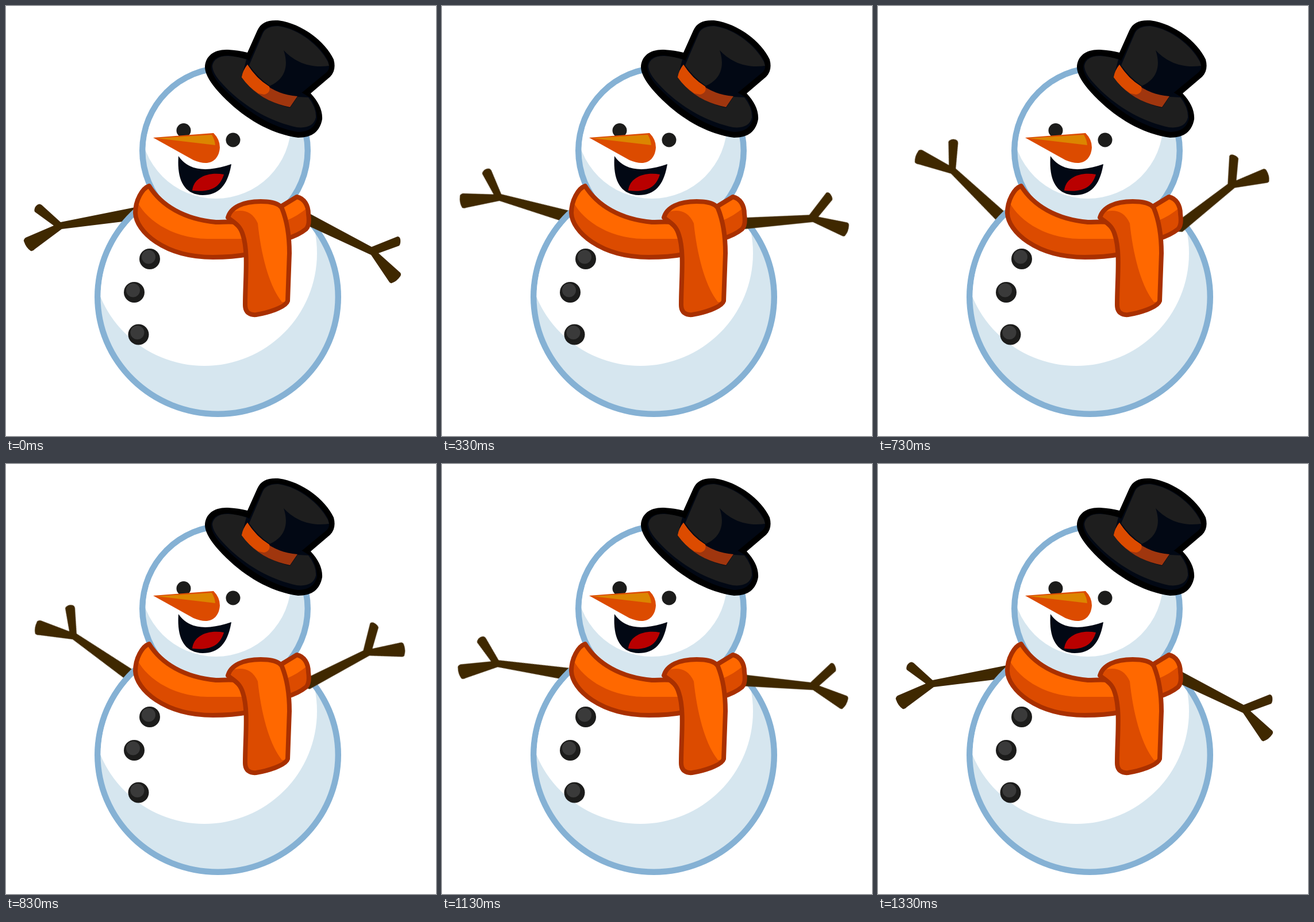
An HTML page for the animation above (1.36 s loop, 748 px wide and 748 px high).

```html
<!DOCTYPE html>
<html lang="en">
<head>
<meta charset="utf-8">
<title>Waving snowman</title>
<style>
  html, body { margin: 0; width: 100%; height: 100%; overflow: hidden; background: #fff; }
  svg { display: block; width: 100vw; height: 100vh; }
  .arm { fill: #3f2800; }
  #left { transform-origin: 209px 370px; }
  #right { transform-origin: 536px 386px; }
  .rim { fill: #85b1d4; }
  .shade { fill: #d6e6ef; }
  .snow { fill: #fff; }
  .coal { fill: #1c1c1b; }
  .glint { fill: #3a3a3a; }
  .night { fill: #020814; }
  .orange { fill: #ff6800; }
  .rust { fill: #dc4b00; }
  .edge { fill: none; stroke: #a93000; stroke-width: 8; stroke-linejoin: round; }
</style>
</head>
<body>
<svg viewBox="0 0 748 748">
  <defs>
    <clipPath id="bodyClip"><ellipse cx="368.5" cy="506" rx="204" ry="198.500"/></clipPath>
    <clipPath id="headClip"><circle cx="381" cy="251.500" r="138.500"/></clipPath>
    <path id="ring" d="M249 313C237 317 225 338 225 360C226 392 275 437 360 437C388 437 405 435 420 432V378C398 374 382 376 365 376C310 371 270 347 249 313Z"/>
    <path id="end" d="M478 349L506 332C519 335 526 347 526 362C528 376 526 384 522 388Q510 398 488 405Z"/>
    <path id="tail" d="M386 368C391 350 412 340 443 340C462 340 475 343 480 352C489 374 493 402 493 430L490 513C487 524 455 534 435 537C424 538 416 533 416 520C416 475 422 428 412 398C407 381 398 378 386 368Z"/>
    <clipPath id="ringClip"><use href="#ring"/></clipPath>
    <clipPath id="endClip"><use href="#end"/></clipPath>
    <clipPath id="tailClip"><use href="#tail"/></clipPath>
    <g id="button">
      <circle class="coal" r="18"/>
      <circle class="glint" cx="-2" cy="-3.500" r="12"/>
    </g>
  </defs>

  <path id="left" class="arm" d="M230 349L95 376L62 346Q57 342 52 348Q48 353 50 358L83 382L34 403Q30 406 31 409Q35 421 43 426Q47 427 50 423L97 388L228 372Z"/>

  <ellipse class="rim" cx="368.5" cy="506" rx="214.500" ry="209"/>
  <g clip-path="url(#bodyClip)">
    <rect class="shade" x="150" y="290" width="440" height="430"/>
    <circle class="snow" cx="345" cy="430" r="196"/>
  </g>

  <path id="right" class="arm" d="M515 354L636 419L681 401Q685 401 686 406Q687 413 684 417L648 430L686 464Q688 467 686 470Q680 479 671 482Q668 483 666 479L635 433L527 383Z"/>

  <circle class="rim" cx="381" cy="251.500" r="149"/>
  <g clip-path="url(#headClip)">
    <rect class="shade" x="230" y="100" width="302" height="302"/>
    <circle class="snow" cx="365" cy="204" r="131"/>
  </g>

  <use href="#button" x="250" y="440"/>
  <use href="#button" x="223" y="498"/>
  <use href="#button" x="230.500" y="571.500"/>

  <circle class="coal" cx="309" cy="216.500" r="12.500"/>
  <circle class="coal" cx="395" cy="233" r="12.500"/>
  <path class="rust" d="M256 229L361 221Q372 232 372 246C371 263 361 273 347 273Q338 273 326 268Z"/>
  <path fill="#dc8500" d="M262 230L358 224Q363 232 364 242Z"/>
  <path class="night" d="M300 261C318 288 352 289 392 275C386 311 371 329 342 329C310 328 297 303 300 261Z"/>
  <path fill="#b90000" d="M324 321C326 299 351 288 379 293C373 313 359 325 324 321Z"/>

  <use href="#ring" class="orange"/>
  <path class="rust" clip-path="url(#ringClip)" d="M226 336C240 368 285 404 350 405H425V450H224Z"/>
  <use href="#ring" class="edge"/>
  <use href="#end" class="orange"/>
  <path class="rust" clip-path="url(#endClip)" d="M486 374Q510 365 532 344V410H470Z"/>
  <use href="#end" class="edge"/>
  <use href="#tail" class="orange"/>
  <path class="rust" clip-path="url(#tailClip)" d="M380 366C398 352 426 350 438 378C444 435 458 487 480 515L496 514V545H405V385Z"/>
  <use href="#tail" class="edge"/>

  <path d="M346 106C347 86 363 75 386 76Q405 77 420 81L437 43C443 29 455 24 473 25C514 30 555 61 570 93Q575 112 564 123L530 152C543 166 551 181 550 197C546 218 533 229 508 229C455 222 404 189 365 144Q346 121 346 106Z"/>
  <path class="night" d="M357 106C358 92 369 86 388 86L418 92L530 160Q541 178 541 196C537 212 526 219 507 219C460 211 414 181 374 139Q357 120 357 106Z"/>
  <path fill="#1e1e1e" d="M359 104C361 92 372 86 388 87Q404 88 418 93L410 124C430 152 462 170 494 177L507 158L526 159Q540 177 539 194C536 207 525 213 506 211C459 201 412 174 377 136Q359 117 359 104Z"/>
  <path class="night" d="M420 102L446 46Q452 34 473 34C508 38 546 67 560 95Q565 108 558 115L507 157Q460 153 420 102Z"/>
  <path fill="#1e1e1e" d="M423 103L447 47Q453 35 473 35C508 39 545 68 560 97L562 104C525 109 500 95 483 77C492 104 486 127 459 139Q438 125 423 103Z"/>
  <path fill="#a0360e" d="M420 102C442 134 467 154 507 157L494 176C458 169 429 151 410 124Q412 112 420 102Z"/>
  <path class="rust" d="M420 102Q435 126 458 140Q461 151 449 154L439 152Q422 141 410 124Q412 112 420 102Z"/>
</svg>
<script>
  const LOOP = 1360, FRAMES = 41, PEAK = 21.6, LAST = FRAMES - 1;

  // Raise evenly up to the peak, then lower evenly; 0..1
  const lift = n => n < PEAK ? n / PEAK : (LAST - n) / (LAST - PEAK);

  // 30 fps, with start times rounded to 10 ms
  const startOf = n => Math.round(n * 10 / 3) * 10;

  function wave(id, angle) {
    const steps = Array.from({ length: FRAMES }, (_, n) => ({
      offset: startOf(n) / LOOP,
      transform: `rotate(${angle * lift(n)}deg)`,
      easing: 'step-end'
    }));
    steps.push({ offset: 1, transform: 'rotate(0deg)' });
    document.getElementById(id).animate(steps, { duration: LOOP, iterations: Infinity });
  }

  wave('left', 54);
  wave('right', -66.3);
</script>
</body>
</html>
```
